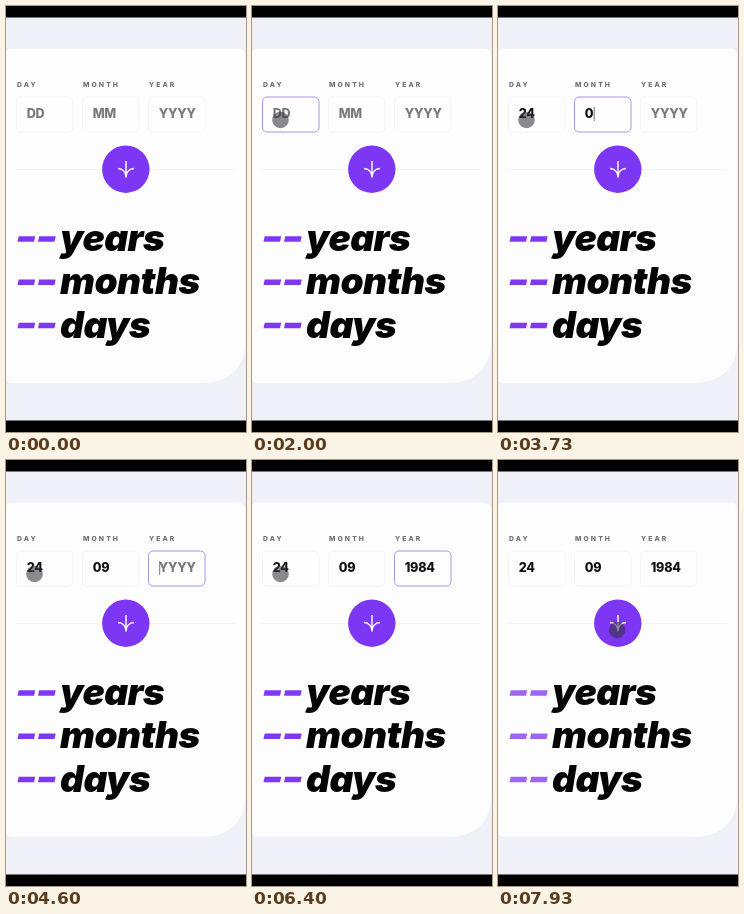
An HTML page that plays this animation: 240 px wide and 426 px high, repeating every 8 s.

```html
<!DOCTYPE html>
<html lang="en">
<head>
<meta charset="utf-8">
<title>Age calculator</title>
<style>
  html, body { margin: 0; width: 100%; height: 100%; overflow: hidden; background: #000; }
  svg { display: block; width: 100%; height: 100%; }
  text { font-family: Inter, "Open Sans", sans-serif; }
  .label { font-size: 6.8px; font-weight: 800; letter-spacing: 2.1px; fill: #716f6f; }
  .value { font-size: 12.6px; font-weight: 800; letter-spacing: -.2px; }
  .unit { font-size: 37px; font-weight: 900; font-style: italic; letter-spacing: -.5px; fill: #040404; }
  .dash { fill: #8037f3; }
  .box { fill: #fefefe; stroke-width: 1; }
  .caret { fill: #77718a; }
</style>
</head>
<body>
<svg id="stage" viewBox="0 0 240 426">
  <rect width="240" height="426" fill="#000"/>
  <rect y="11.5" width="240" height="403" fill="#f0f0f8"/>
  <path d="M6 42.500H231Q239.500 42.500 239.500 51V332Q239.500 377 194 377H6Q0 377 0 371V48Q0 42.500 6 42.500Z" fill="#fdfdfe"/>
  <g id="fields"></g>
  <path d="M9 163.500H229" stroke="#f5f5f6"/>
  <circle cx="119.800" cy="163.200" r="23.700" fill="#7d36f3"/>
  <path d="M120 155V171.500M112 162.500C117 162.500 120 166.500 120 171.500C120 166.500 123 162.500 128 162.500"
        fill="none" stroke="#fff" stroke-width="1.400"/>
  <g id="results"></g>
  <circle id="pointer" r="8.300" fill="#34343c" fill-opacity=".58"/>
</svg>
<script>
const LOOP = 8000;
const $ = id => document.getElementById(id);

function add(parent, tag, attrs, content = "") {
  const node = document.createElementNS("http://www.w3.org/2000/svg", tag);
  for (const key in attrs) node.setAttribute(key, attrs[key]);
  node.textContent = content;
  return parent.appendChild(node);
}

// keys: the times at which each character is typed
const fields = [
  { label: "DAY", hint: "DD", value: "24", x: 11, focus: 1300, blur: 3230, keys: [2470, 2800] },
  { label: "MONTH", hint: "MM", value: "09", x: 77, focus: 3230, blur: 4470, keys: [3600, 3930] },
  { label: "YEAR", hint: "YYYY", value: "1984", x: 143, focus: 4470, blur: 7670, keys: [4870, 5130, 5400, 5730] }
];

for (const f of fields) {
  add($("fields"), "text", { class: "label", x: f.x, y: 80.7 }, f.label);
  f.box = add($("fields"), "rect", { class: "box", x: f.x - .5, y: 91, width: 56.5, height: 35, rx: 4.5 });
  f.text = add($("fields"), "text", { class: "value", x: f.x + 9.7, y: 112.3 });
  f.caret = add($("fields"), "rect", { class: "caret", y: 101, width: 1, height: 14 });
}

["years", "months", "days"].forEach((unit, i) => {
  const y = 245 + i * 43.3;
  for (const x of [11.5, 32])
    add($("results"), "path", { class: "dash", d: `M${x + 1.2} ${y - 14.8}h16.500l-1.200 5.500h-16.500z` });
  add($("results"), "text", { class: "unit", x: 54, y }, unit);
});

// time, x, y
const path = [
  [0, -12, 150], [530, -12, 150], [870, 25, 117], [1200, 28.5, 114],
  [6730, 28.5, 114], [7470, 119, 170], [LOOP, 119, 170]
];

const clamp = v => Math.max(0, Math.min(1, v));
const smooth = v => { v = clamp(v); return v * v * (3 - 2 * v); };
const mix = (a, b, p) => a + (b - a) * p;

function pointerAt(t) {
  const i = Math.max(1, path.findIndex(p => p[0] > t));
  const [t0, x0, y0] = path[i - 1], [t1, x1, y1] = path[i];
  const p = smooth((t - t0) / (t1 - t0));
  return [mix(x0, x1, p), mix(y0, y1, p)];
}

function drawField(f, t) {
  const typed = f.keys.filter(k => k <= t);
  const active = t >= f.focus && t < f.blur;
  const glow = smooth((t - f.focus) / 130) * (1 - smooth((t - f.blur) / 130));
  const rgb = [[244, 174], [244, 145], [245, 232]].map(([a, b]) => Math.round(mix(a, b, glow)));

  f.box.setAttribute("stroke", `rgb(${rgb})`);
  f.text.textContent = typed.length ? f.value.slice(0, typed.length) : f.hint;
  f.text.setAttribute("fill", typed.length ? "#111" : "#7b7979");

  const since = t - (typed.length ? typed[typed.length - 1] : f.focus);
  f.caret.style.display = active && since % 1060 < 530 ? "" : "none";
  f.caret.setAttribute("x", f.x + 10.2 + (typed.length ? f.text.getComputedTextLength() : 0));
}

const dashes = document.querySelectorAll(".dash");

function draw(t) {
  fields.forEach(f => drawField(f, t));
  $("pointer").setAttribute("transform", `translate(${pointerAt(t)})`);
  const fade = mix(1, .77, smooth((t - 7730) / 200));
  dashes.forEach(d => d.setAttribute("opacity", fade));
}

const start = performance.now();
function tick() {
  draw((performance.now() - start) % LOOP);
  requestAnimationFrame(tick);
}
tick();
</script>
</body>
</html>
```
